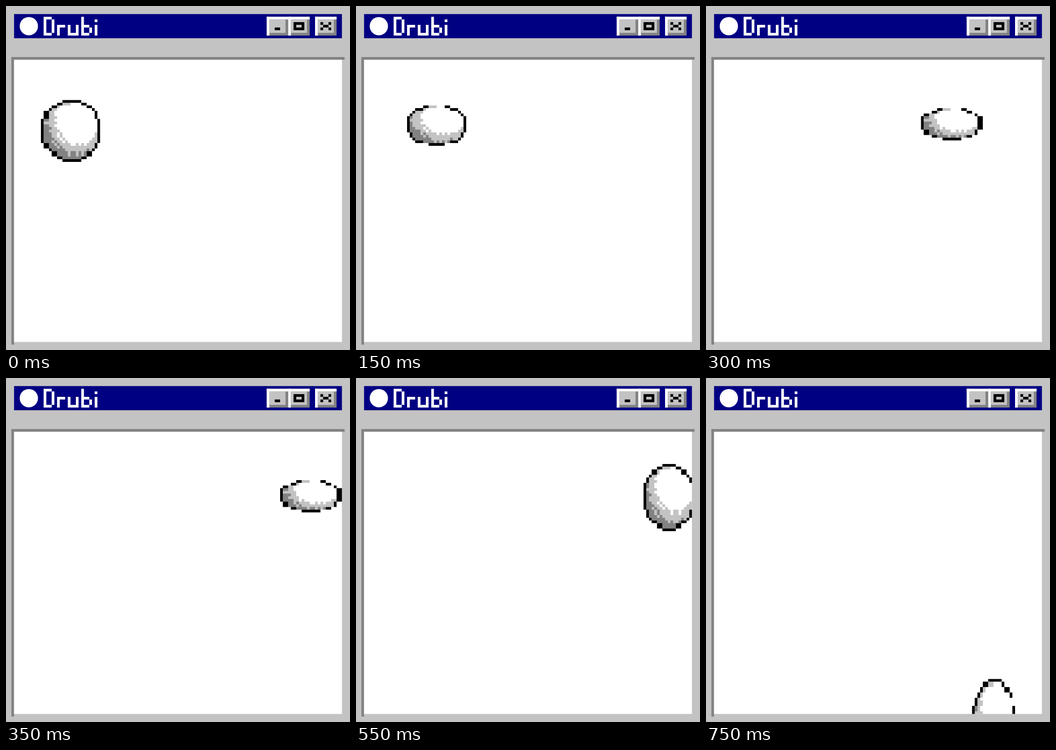
An HTML page for the animation above (0.8 s loop, 748x748 px).

```html
<!DOCTYPE html>
<html lang="en">
<head>
<meta charset="utf-8">
<title>Drubi</title>
<style>
  html, body { margin: 0; width: 100%; height: 100%; overflow: hidden; background: #c3c3c3; }
  svg { display: block; width: 100vw; height: 100vh; }
</style>
</head>
<body>
<svg viewBox="0 0 128 128">
  <g id="ui"></g>
  <circle cx="8.5" cy="7.5" r="3.4" fill="#fff"/>
  <path role="img" aria-label="Drubi" fill="none" stroke="#fff" d="
    M14.5 11V4.5H17M14.5 10.5H17M17.5 5v5
    M19.5 7v4M20 7.5h2
    M23.5 7v4M24 10.5h2M26.5 7v4
    M28.5 4v7M29 7.5h2M29 10.5h2M31.5 8v2
    M33.5 5v1M33.5 7v4"/>
  <g id="ball"></g>
</svg>
<script>
const NS = 'http://www.w3.org/2000/svg';
const SILVER = '#c3c3c3', GRAY = '#828282', NAVY = '#000082', BLACK = '#000', WHITE = '#fff';
const LOOP = 800, STEP = 50, SIZE = 20, EDGE = 125;
const $ = id => document.getElementById(id);

function add(parent, tag, attrs) {
  const el = document.createElementNS(NS, tag);
  for (const k in attrs) el.setAttribute(k, attrs[k]);
  return parent.appendChild(el);
}
const box = (x, y, width, height, fill) => add($('ui'), 'rect', { x, y, width, height, fill });

// Window
box(3, 3, 122, 9, NAVY);
box(2, 19, 124, 1, GRAY);
box(2, 19, 1, 107, GRAY);
box(3, 20, 122, 105, WHITE);

for (const x of [97, 105, 115]) {
  box(x, 4, 8, 7, GRAY);
  box(x, 4, 8, 1, WHITE);
  box(x, 4, 1, 7, WHITE);
  box(x + 1, 5, 6, 5, SILVER);
}
box(100, 8, 2, 1, BLACK);
box(107, 6, 4, 3, BLACK);
box(108, 7, 2, 1, SILVER);
for (const x of [117, 120]) for (const y of [6, 8]) box(x, y, 1, 1, BLACK);
box(118, 7, 2, 1, BLACK);

// Outline: distance of the ring from the side of the ball, by row
const inset = row => Math.max(0, Math.round(9.5 - Math.sqrt(97 - (9.5 - row) ** 2)));

// Ball lit from the upper right, with a checker dither
function tone(x, y) {
  const row = Math.min(y, SIZE - 1 - y);
  const col = Math.min(x, SIZE - 1 - x);
  const start = inset(row);
  const end = row ? Math.max(start + 1, inset(row - 1)) : SIZE / 2;
  if (col < start) return null;
  if (col < end) return BLACK;
  const d = Math.hypot(x - 11.6, y - 6.5) + ((x + y) % 2 ? 0.5 : -0.5);
  if (d > 10.35) return GRAY;
  const rim = y < 7 && x < 10 && (y === 1 || x === end);
  return d > 7.6 || rim ? SILVER : null;
}

// Shapes: width, height, then first and last sampled column and row
const round = [20, 20, 0.5, 19.5, 0.5, 19.5];
const landed = [22, 23, 0.12, 19.02, 0.565, 19.7];
const flat = [23, 12, 0.12, 19.92, 1.3, 19.05];
const smash = [7, 31, 0.5, 19.5, 0.5, 19.5];
const thin = [10, 21, 2.2, 19.05, 0, 19.3];
const long = [16, 35, 0.3, 19.05, 0.45, 19.83];

const mix = (a, b, k) => a.map((v, i) => v + (b[i] - v) * k);

// Place and shape of the ball for each step of the loop
function pose(n) {
  if (n === 0) return [13, 35, landed];
  if (n < 4) {
    const k = (n - 1) / 3;
    return [13 + 13 * k ** 2, 34 + 4 * k, mix(round, flat, k)];
  }
  if (n < 8) return [Math.min(26 + 27 * (n - 4), EDGE - flat[0]), 38, flat];
  if (n === 8) return [EDGE - smash[0], 29, smash];
  if (n < 11) return [EDGE - thin[0], 33, thin];
  const k = n - 11;
  return [99 + 8 * 0.35 ** k, 32 + 19 * k + k * k / 4, mix(round, long, Math.min(1, (k + 1) / 3))];
}

function lines(size, first, last) {
  const n = Math.round(size);
  return Array.from({ length: n }, (_, i) => Math.floor(first + (last - first) * i / (n - 1)));
}

const layers = {};
for (const fill of [SILVER, GRAY, BLACK]) layers[fill] = add($('ball'), 'path', { fill });

function draw(n) {
  const [left, top, [w, h, u0, u1, v0, v1]] = pose(n);
  const d = { [SILVER]: '', [GRAY]: '', [BLACK]: '' };
  const cols = lines(w, u0, u1);
  lines(h, v0, v1).forEach((v, j) => cols.forEach((u, i) => {
    const x = Math.round(left) + i, y = Math.round(top) + j, fill = tone(u, v);
    if (!fill || x >= EDGE || y >= EDGE) return;
    const cell = `M${x} ${y}h1v1h-1z`;
    d[fill] += cell;
    if (fill === GRAY) d[SILVER] += cell; // hides seams
  }));
  for (const fill in d) layers[fill].setAttribute('d', d[fill]);
}

let shown;
function update(now) {
  const n = Math.floor(now % LOOP / STEP);
  if (n !== shown) draw(shown = n);
}

const begin = performance.now();
function tick() {
  update(performance.now() - begin);
  requestAnimationFrame(tick);
}
tick();
</script>
</body>
</html>
```
